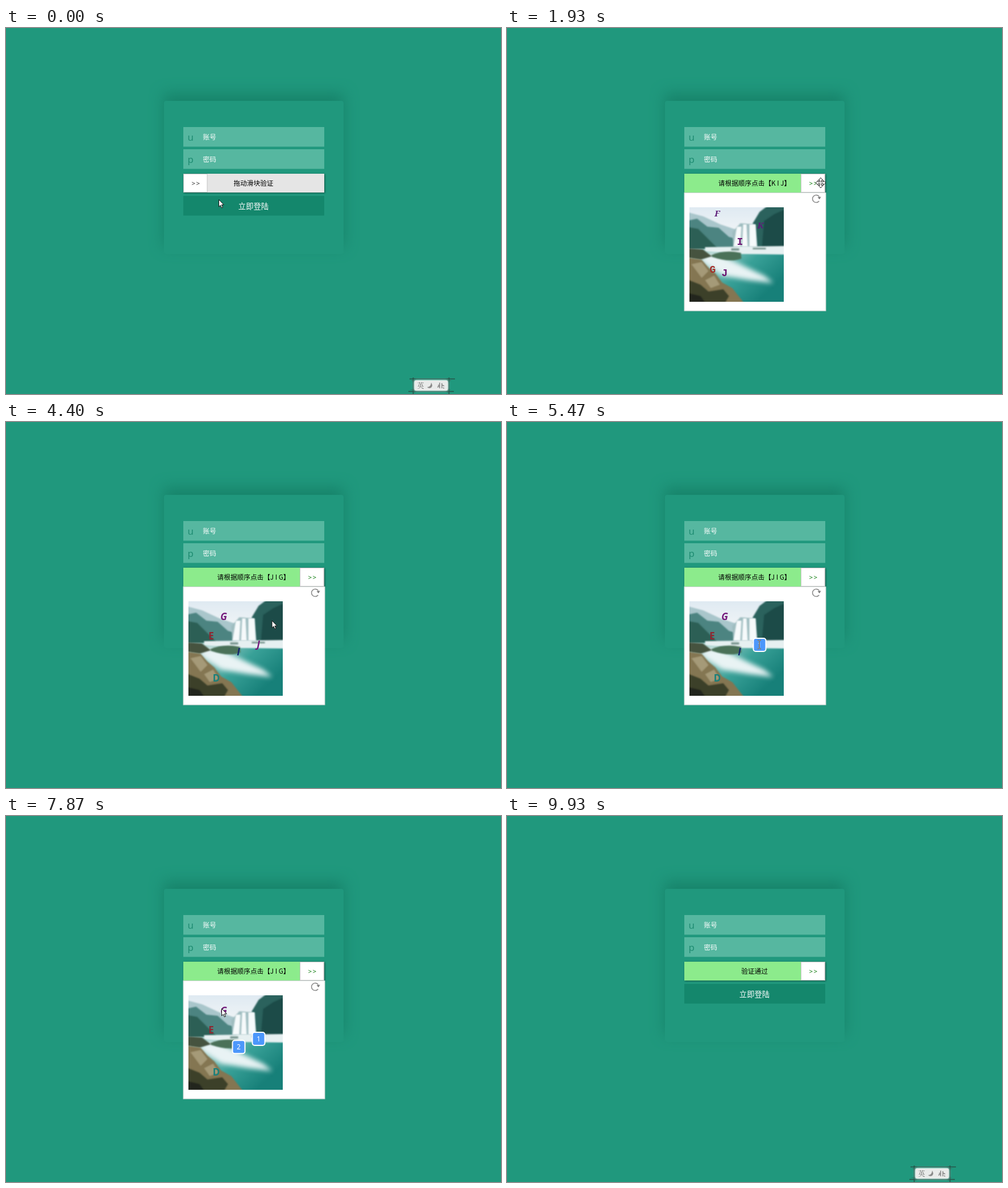
Animation, 871 px wide and 643 px high, one loop 9.99 s. Source, as an HTML page with a canvas:

```html
<!DOCTYPE html>
<html lang="zh-CN">
<head>
<meta charset="utf-8">
<style>
  html, body { margin: 0; width: 100%; height: 100%; overflow: hidden; background: #20987d; }
  canvas { display: block; }
</style>
</head>
<body>
<canvas id="stage" width="871" height="643"></canvas>
<script>
const LOOP = 9990, STEP = 1000 / 15;
const SANS = '"Noto Sans CJK SC", "Noto Sans CJK", sans-serif';
const LATIN = '"Noto Sans", sans-serif';
const SERIF = 'italic bold 15px "Noto Serif", serif';
const MONO = 'bold 18px "Liberation Mono", monospace';
const BOLD = 'bold 17px "Open Sans", sans-serif';
const SLANT = 'italic ' + BOLD;
const ctx = document.getElementById('stage').getContext('2d');

function rect(c, x, y, w, h, fill) {
  c.fillStyle = fill;
  c.fillRect(x, y, w, h);
}

function shape(c, path, fill, stroke, width = 1) {
  const p = new Path2D(path);
  if (fill) { c.fillStyle = fill; c.fill(p); }
  if (stroke) { c.strokeStyle = stroke; c.lineWidth = width; c.stroke(p); }
}

function text(str, x, y, font, fill, align = 'center') {
  ctx.font = font;
  ctx.fillStyle = fill;
  ctx.textAlign = align;
  ctx.fillText(str, x, y);
}

function gradient(c, x0, y0, x1, y1, ...colors) {
  const g = c.createLinearGradient(x0, y0, x1, y1);
  colors.forEach((color, i) => g.addColorStop(i / (colors.length - 1), color));
  return g;
}

// Soft landscapes, rendered once
function landscape(paint) {
  const canvas = document.createElement('canvas');
  canvas.width = canvas.height = 166;
  const c = canvas.getContext('2d');
  paint(c);
  return canvas;
}

const waterfall = landscape(c => {
  rect(c, 0, 0, 166, 166, gradient(c, 0, 0, 0, 75, '#dfeaf2', '#eef3f6', '#b5d0d4'));
  c.filter = 'blur(1.2px)';
  shape(c, 'M-5 8L25 16 55 30 85 40V75H-5Z', '#a9c6cb');
  shape(c, 'M-5 24L14 20 32 34 52 36 70 52 85 56V74H-5Z', '#4c8481');
  shape(c, 'M-5 34L16 38 34 56 52 74H-5Z', '#2c5f55');
  shape(c, 'M112 28L124 8 140 -4H172V74H112Z', '#2b625d');
  shape(c, 'M132 24L150 12 172 2V72H128Z', '#1c4b48');
  shape(c, 'M76 44L90 28 116 30 120 70H78Z', '#9fbdc0');
  shape(c, 'M84 34H92L90 69H78ZM95 30H101L103 69H93ZM106 30H117L119 69H106Z', '#f6fafb');
  rect(c, -5, 73, 176, 98, gradient(c, 40, 80, 120, 166, '#a5d1cd', '#39a198', '#178079'));
  shape(c, 'M28 70L168 68V83L92 82 28 77Z', '#e6f0f1');
  shape(c, 'M74 72H88V76H74ZM112 71H135V74H112Z', '#7d9993');
  c.filter = 'blur(4px)';
  shape(c, 'M20 84L50 82 90 100 132 120 148 133 106 128 58 120 26 98Z', '#e9f3f4');
  c.filter = 'blur(1.2px)';
  shape(c, 'M39 84Q62 74 91 80L92 90Q72 98 40 87Z', '#4a7158');
  shape(c, 'M-5 72L24 74 40 86 20 92-5 88Z', '#46533f');
  shape(c, 'M-5 88L22 92 34 106 46 116 58 132 76 142 98 170H-5Z', '#847652');
  shape(c, 'M4 100L22 96 34 112 22 124ZM28 128L44 120 54 136 38 142Z', '#a59a78');
  shape(c, 'M-5 126L20 136 34 148 60 144 70 156 62 170H-5Z', '#3c4029');
  shape(c, 'M-5 150L20 156 30 170H-5Z', '#22251d');
});

const valley = landscape(c => {
  rect(c, 0, 0, 166, 166, gradient(c, 0, 0, 130, 70, '#aab7bf', '#c2c3b5', '#d8d09b'));
  c.filter = 'blur(1.5px)';
  shape(c, 'M106 32H111V44H106Z', '#f2eccb');
  shape(c, 'M-5 62L18 50 38 38 52 46 70 62 92 70 120 64 150 76 172 66V100H-5Z', '#a8a590');
  shape(c, 'M-5 70L24 60 44 66 66 78 78 92H-5Z', '#87866f');
  shape(c, 'M58 90Q100 84 140 92L128 122H58Z', '#dfd6a2');
  shape(c, 'M126 96L144 86 160 70 172 60V142H120Z', '#71643b');
  shape(c, 'M136 98L152 78 172 74V138H132Z', '#5b502c');
  rect(c, -5, 119, 176, 50, gradient(c, 0, 119, 0, 166, '#736a35', '#4c4a25', '#302d18'));
  shape(c, 'M20 122Q16 94 28 84 40 64 50 82 62 88 58 122Z', '#48381d');
  shape(c, 'M54 130Q56 100 70 98 84 104 82 134Z', '#473a20');
  shape(c, 'M-5 116L22 118 60 136 96 140 60 150-5 138Z', '#3d4020');
  shape(c, 'M80 150Q110 138 140 144L172 140V170H70Z', '#3b361c');
  shape(c, 'M120 148L136 144 146 156 128 160Z', '#6d6038');
  rect(c, 54, 161, 60, 4, '#8f8c78');
});

// Each challenge: from time, prompt letters, picture, [letter, x, y, font, colour]
const challenges = [
  { from: 0, order: 'K I J', picture: waterfall, letters: [
    ['F', 370, 325, SERIF, '#5d1b78'], ['K', 446, 346, SERIF, '#5d1b78'], ['I', 410, 375, MONO, '#6a1470'],
    ['J', 383, 430, MONO, '#6a1470'], ['G', 362, 424, MONO, '#a52f2a']] },
  { from: 3130, order: 'H D K', picture: valley, letters: [
    ['K', 385, 341, SLANT, '#8c2f33'], ['H', 447, 345, SLANT, '#66186c'], ['J', 368, 422, SLANT, '#e98a1c'],
    ['D', 413, 426, SERIF, '#b0261f'], ['I', 361, 450, SLANT, '#111']] },
  { from: 3670, order: 'J I G', picture: waterfall, letters: [
    ['G', 383, 342, SLANT, '#741a7c'], ['E', 361, 376, BOLD, '#8f2630'], ['I', 409, 404, SLANT, '#14256f'],
    ['D', 370, 450, BOLD, '#18807c'], ['J', 444, 391, SLANT, '#741a7c']] }
];

const cursors = {
  arrow() {
    shape(ctx, 'M.5 .5V13L3.4 10.4 5.4 15 7.4 14.1 5.4 9.7H9.3Z', '#fff', '#111');
  },
  move() {
    for (let i = 0; i < 4; i++) {
      shape(ctx, 'M-1.5 0V-4.5H-4L0 -9 4 -4.5H1.5V0', '#fff', '#222');
      ctx.rotate(Math.PI / 2);
    }
    rect(ctx, -1.5, -1.5, 3, 3, '#fff');
  },
  hand() {
    shape(ctx, 'M-1.3 10V1.5Q0 -.5 1.4 1.5V6.5Q3 5.3 4 7 5.6 6 6.4 7.6 8.5 7 8.5 9.5V12L7 17.5H0L-3.6 11.5Q-4 9 -1.3 10Z',
      '#fff', '#222');
    shape(ctx, 'M1.4 7V10M4 7.5V10M6.4 8V10.5', null, '#222', .8);
  },
  ibeam() {
    ctx.globalCompositeOperation = 'difference';
    shape(ctx, 'M-3 -7.5H-1L0 -6.5 1 -7.5H3M0 -6.5V6.5M-3 7.5H-1L0 6.5 1 7.5H3', null, '#fff');
  }
};

// Pointer path: time, x, y, and the cursor used from then on
const path = [
  [0, 374, 301, 'arrow'], [330, 545, 320, 'arrow'], [530, 460, 325, 'arrow'], [730, 328, 290, 'arrow'],
  [800, 336, 272, 'move'], [1200, 336, 272, 'move'], [1930, 552, 272, 'move'], [2200, 555, 274, 'move'],
  [2530, 550, 313, 'arrow'], [2870, 545, 300, 'hand'], [3270, 545, 300, 'hand'], [3400, 545, 297, 'hand'],
  [4130, 545, 297, 'hand'], [4200, 535, 305, 'arrow'], [4600, 400, 392, 'arrow'], [4930, 442, 390, 'arrow'],
  [5070, 442, 390, 'arrow'], [5130, 444, 391, 'arrow'], [5470, 444, 391, 'ibeam'], [5930, 444, 391, 'ibeam'],
  [6000, 438, 393, 'arrow'], [6400, 374, 396, 'arrow'], [6730, 409, 404, 'arrow'], [7000, 409, 404, 'ibeam'],
  [7130, 409, 404, 'ibeam'], [7200, 405, 398, 'arrow'], [7870, 379, 338, 'arrow'], [8400, 379, 338, 'arrow'],
  [8600, 322, 300, 'arrow'], [8800, 545, 330, 'arrow'], [8930, 450, 240, 'ibeam'], [9000, 388, 224, 'ibeam'],
  [9130, 388, 224, 'ibeam'], [9200, 365, 250, 'arrow'], [9530, 74, 650, 'arrow']
];

function pointerAt(t) {
  const i = path.findLastIndex(key => key[0] <= t);
  const [t0, x0, y0, kind] = path[i];
  const [t1, x1, y1] = path[i + 1] || [LOOP, x0, y0];
  const u = (t - t0) / (t1 - t0), k = u * u * (3 - 2 * u);
  return { x: x0 + (x1 - x0) * k, y: y0 + (y1 - y0) * k, kind };
}

function drawForm() {
  rect(ctx, 0, 0, 871, 643, '#20987d');
  ctx.save();
  ctx.shadowColor = '#17836a';
  ctx.shadowBlur = 25;
  ctx.shadowOffsetY = -12.5;
  ctx.fillStyle = '#20987d';
  ctx.beginPath();
  ctx.roundRect(278, 128, 316, 269, 4);
  ctx.fill();
  ctx.restore();
  [['u', '账号', 174], ['p', '密码', 213]].forEach(([icon, label, y]) => {
    rect(ctx, 312, y, 248, 34.5, '#56b7a0');
    text(icon, 319.5, y + 24, '17px ' + LATIN, '#1f8c72', 'left');
    text(label, 346.5, y + 22, '11.67px ' + SANS, '#fff', 'left');
  });
  rect(ctx, 312, 295, 248, 34.5, '#14876c');
  text('立即登陆', 435.5, 317.5, '13.33px ' + SANS, '#fff');
}

function drawSlider(offset, label, done) {
  ctx.save();
  ctx.shadowColor = 'rgba(0,0,0,.45)';
  ctx.shadowBlur = 3;
  ctx.shadowOffsetX = ctx.shadowOffsetY = 1;
  rect(ctx, 312, 256, 248, 33, '#e5e5e5');
  ctx.restore();
  rect(ctx, 312, 256, offset, 33, '#8ceb8c');
  text(label, 435.5, 277.3, '11.67px ' + SANS, '#000');
  rect(ctx, 312 + offset, 256, done ? 43 : 42.5, 33, '#c4c4c4');
  rect(ctx, 313 + offset, 257, 40.5, 31, '#fff');
  ['>', '>'].forEach((mark, i) =>
    text(mark, 329.5 + offset + i * 8, 277, 'italic 11.67px ' + LATIN, done ? '#0a7a0a' : '#333'));
}

function drawMarker(label, x, y) {
  ctx.beginPath();
  ctx.roundRect(x - 11, y - 11.5, 22, 23, 4);
  ctx.fillStyle = '#4c97fb';
  ctx.fill();
  ctx.strokeStyle = '#fff';
  ctx.lineWidth = 2;
  ctx.stroke();
  text(label, x, y + 4, '12px ' + LATIN, '#fff');
}

function drawPanel(t, challenge) {
  rect(ctx, 311.5, 289, 250, 208.5, '#c8d2cf');
  rect(ctx, 312.5, 290, 248, 206.5, '#fff');
  shape(ctx, 'M549.2 304A6.5 6.5 0 1 1 549.5 296.5', null, '#8c8c8c', 1.6);
  shape(ctx, 'M546.5 297.5L552.5 296.5 550 301Z', '#777');
  ctx.drawImage(challenge.picture, 320.5, 315, 166, 166);
  challenge.letters.forEach(([letter, x, y, font, fill]) => text(letter, x, y + 6, font, fill));
  if (t >= 5470) drawMarker('1', 444.5, 391.5);
  if (t >= 7000) drawMarker('2', 409.5, 405.8);
}

function drawInputBar() {
  shape(ctx, 'M710 616.5H790M708 638.5H788M716.5 614V643M779.5 614V643', null, 'rgba(40,60,55,.75)', 1.6);
  shape(ctx, 'M713 619.5H783M712 635.5H782M719 615V641M777 615V641', null, 'rgba(70,80,78,.45)');
  ctx.save();
  ctx.shadowColor = '#fff';
  ctx.shadowBlur = 4;
  ctx.beginPath();
  ctx.roundRect(718.5, 619, 59, 18, 3);
  ctx.fillStyle = '#e9ebea';
  ctx.fill();
  ctx.restore();
  text('英', 729.5, 632.5, '12px "Noto Serif CJK SC", ' + SANS, '#666');
  shape(ctx, 'M748 623Q752 628 748 632 744 634 741 631 748 630 748 623Z', '#8a8a8a');
  shape(ctx, 'M763 623V633M760 628L763 627M759 631L763 629M767 624V633M767 627L771 629M769 632L771 633', null, '#888', 1.5);
}

function draw(t) {
  const pointer = pointerAt(t);
  const offset = t < 1200 ? 0 : t >= 1930 ? 205 : Math.min(205, pointer.x - 336);
  const done = offset === 205, passed = t >= 8130;
  const challenge = challenges.findLast(item => item.from <= t);
  const label = passed ? '验证通过' : done ? `请根据顺序点击【${challenge.order}】` : '拖动滑块验证';

  drawForm();
  drawSlider(offset, label, done);
  if (done && !passed) drawPanel(t, challenge);
  if (t < 1000 || t >= 9930) drawInputBar();

  ctx.save();
  ctx.translate(pointer.x, pointer.y);
  cursors[pointer.kind]();
  ctx.restore();
}

let start;
function frame(now) {
  start ??= now;
  const step = Math.floor(((now - start) % LOOP + 4) / STEP);
  draw(Math.round(step * STEP / 10) * 10 % LOOP);
  requestAnimationFrame(frame);
}
draw(0);
requestAnimationFrame(frame);
</script>
</body>
</html>
```
